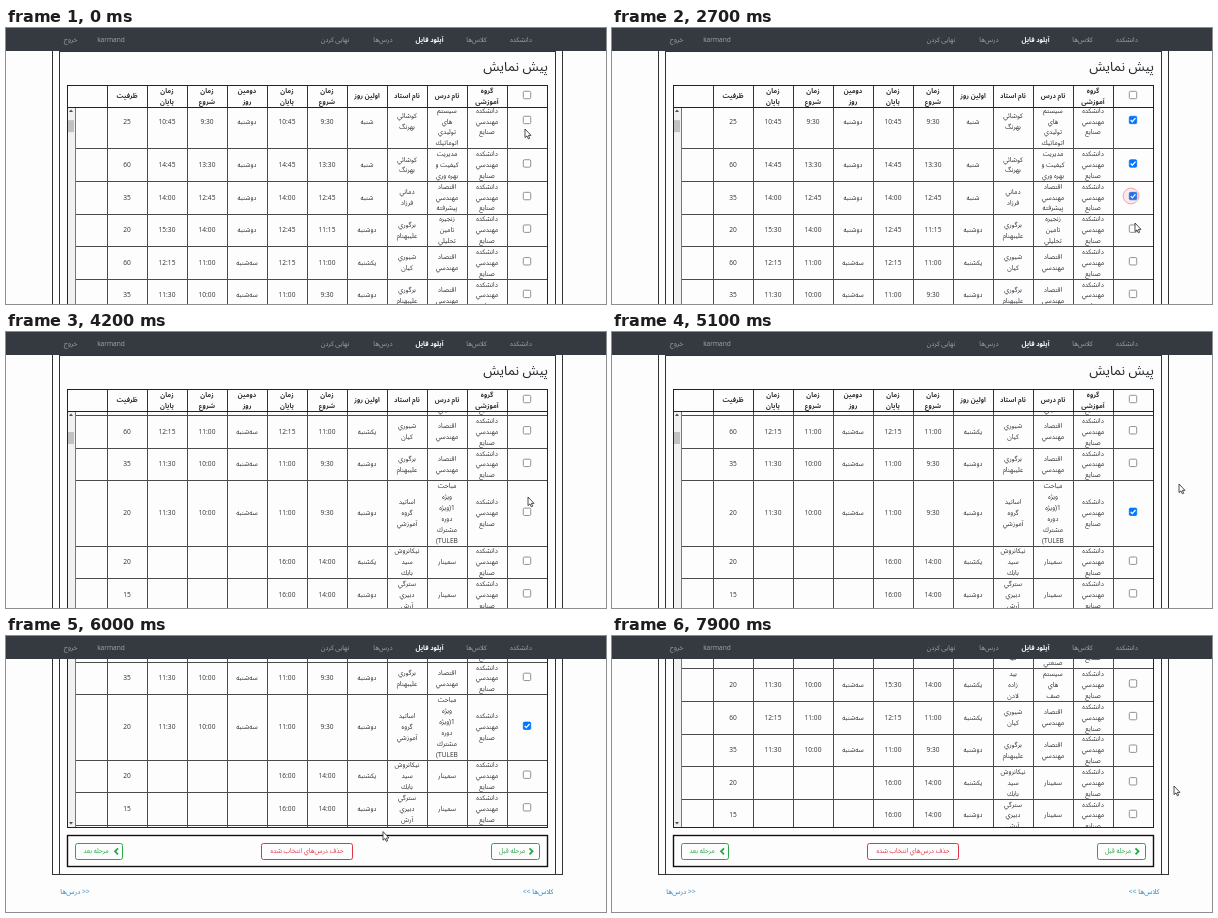
Animation of 600 by 276 pixels, one loop 8 s. Source, as an HTML page:

```html
<!DOCTYPE html>
<html lang="fa">
<head>
<meta charset="utf-8">
<title>پیش نمایش</title>
<style>
  html, body { margin: 0; width: 100%; height: 100%; overflow: hidden; background: #fdfdfd; }
  svg { display: block; }
  text {
    font-family: "Open Sans", "Noto Sans", "Noto Sans Arabic", "DejaVu Sans", sans-serif;
    direction: rtl; text-anchor: middle; white-space: pre;
  }
</style>
</head>
<body>
<svg id="stage" width="600" height="276" viewBox="0 0 600 276"></svg>
<script>
const LOOP = 8000, LINE = 10.87, LIST_TOP = 323, LIST_H = 202;
const INK = '#2b2f33', GREEN = '#28a745', RED = '#dc3545', BLUE = '#1b82cc';
const COLUMNS = [481, 441, 401, 361, 321, 281, 241, 201, 161, 121];
const NON_JOINER = String.fromCharCode(8204);

function add(parent, tag, attrs = {}, content) {
  const node = document.createElementNS('http://www.w3.org/2000/svg', tag);
  for (const key in attrs) node.setAttribute(key, attrs[key]);
  if (content !== undefined) node.textContent = content;
  parent.append(node);
  return node;
}
const group = parent => add(parent, 'g');
const show = (node, on) => node.setAttribute('display', on ? 'inline' : 'none');
const move = (node, x, y) => node.setAttribute('transform', `translate(${x} ${y})`);

// y is the visual middle of the line; "~" stands for a zero-width non-joiner
function label(parent, x, y, content, size = 6.6, fill = INK, attrs = {}) {
  return add(parent, 'text', { x, y: y + size * 0.34, 'font-size': size, fill, ...attrs },
    content.replace('~', NON_JOINER));
}
function lines(parent, x, mid, words, attrs) {
  words.forEach((word, i) =>
    label(parent, x, mid + (i - (words.length - 1) / 2) * LINE, word, 6.6, INK, attrs));
}
function box(parent, x, y, right, bottom, attrs = {}) {
  return add(parent, 'rect', {
    x: x + .5, y: y + .5, width: right - x, height: bottom - y,
    fill: 'none', stroke: '#333', ...attrs
  });
}
const rule = (parent, d, stroke = '#4a4a4a') =>
  add(parent, 'path', { d, stroke, fill: 'none', 'stroke-width': 1 });

function checkbox(parent, x, y, size = 7.4) {
  const g = group(parent), h = size / 2;
  const square = add(g, 'rect', {
    x: x - h, y: y - h, width: size, height: size, rx: 1.2,
    fill: '#fff', stroke: '#777', 'stroke-width': .8
  });
  const tick = add(g, 'path', {
    d: `M${x - 2.3} ${y + .1}l1.6 1.7l3.2-3.6`, fill: 'none', stroke: '#fff', 'stroke-width': 1.3
  });
  return on => {
    square.setAttribute('fill', on ? '#0075ff' : '#fff');
    square.setAttribute('stroke', on ? '#0075ff' : '#777');
    show(tick, on);
  };
}

const stage = document.getElementById('stage');
add(stage, 'rect', { width: 600, height: 276, fill: '#fdfdfd' });
const page = group(stage);

// Upload section
function pageLinks(y) {
  const ltr = { style: 'direction:ltr' };
  label(page, 532, y, '<< کلاس~ها', 6.8, BLUE, ltr);
  label(page, 69, y, 'درس~ها >>', 6.8, BLUE, ltr);
}
const fromRight = { style: 'text-anchor:start' };
const heading = { style: 'text-anchor:start', 'font-weight': 500 };
pageLinks(50);
pageLinks(590);
box(page, 46, 66, 556, 572);
label(page, 301, 97, 'آپلود گزارش 110', 13.2, '#212529', { 'font-weight': 500 });
rule(page, 'M53 130.5H549', '#333');
const intro = label(page, 542, 143, 'برای مشاهده راهنمای این بخش ', 6.6, INK, fromRight);
add(intro, 'tspan', { fill: BLUE }, 'اینجا');
add(intro, 'tspan', {}, ' کلیک کنید');
box(page, 53, 163, 549, 260);
label(page, 542, 179, 'آپلود فایل', 13.2, '#212529', heading);
box(page, 139, 189, 462, 252);
label(page, 452, 210, 'محل آپلود فایل', 6.6, INK, fromRight);
box(page, 183, 200, 405, 219, { rx: 2, stroke: '#dcdfe3', fill: '#fff' });
const formButton = { rx: 1, fill: '#efefef', stroke: '#666' };
box(page, 357, 204, 400, 216, formButton);
label(page, 379, 210, 'Choose File', 6.6, '#111');
label(page, 332.5, 210, 'No file chosen');
box(page, 151, 204, 180, 216, formButton);
label(page, 166, 210, 'Upload', 6.6, '#111');
checkbox(page, 449, 232, 5.8)(false);
label(page, 444, 233, 'اضافه کردن به جدول قبلی', 6.6, INK, fromRight);

// Preview section
box(page, 53, 267, 549, 572);
label(page, 542, 283, 'پیش نمایش', 13.2, '#212529', heading);
const columnRules = (top, bottom) =>
  [...COLUMNS.map(x => x + 20), 101].map(x => `M${x + .5} ${top}V${bottom}`).join('');

const titles = ['گروه آموزشی', 'نام درس', 'نام استاد', 'اولین روز', 'زمان شروع', 'زمان پایان',
  'دومین روز', 'زمان شروع', 'زمان پایان', 'ظرفیت'];
titles.forEach((title, i) => {
  const wrapped = i === 0 || (i > 3 && i < 9);
  lines(page, COLUMNS[i], 312, wrapped ? title.split(' ') : [title], { 'font-weight': 700 });
});
rule(page, columnRules(301, LIST_TOP), '#333');
checkbox(page, 521, 311)(false);

const DEPT = 'دانشكده مهندسي صنايع';
const [SAT, SUN, MON, TUE] = ['شنبه', 'يكشنبه', 'دوشنبه', 'سه~شنبه'];
const courses = [
  ['كنترل كيفيت آماري صنعتي', 'نيك انديش كيا', SUN, '9:30', '11:00', TUE, '9:30', '11:00', '20'],
  ['سيستم هاي صف', 'بيد زاده لادن', SUN, '14:00', '15:30', TUE, '10:00', '11:30', '20'],
  ['طراحي سيستم هاي توليدي اتوماتيك', 'كوشائي بهرنگ', SAT, '9:30', '10:45', MON, '9:30', '10:45', '25'],
  ['مديريت كيفيت_و بهره_وري', 'كوشائي بهرنگ', SAT, '13:30', '14:45', MON, '13:30', '14:45', '60'],
  ['اقتصاد مهندسي پيشرفته', 'دماني فرزاد', SAT, '12:45', '14:00', MON, '12:45', '14:00', '35'],
  ['زنجيره تامين تحليلي', 'برگوري عليبهنام', MON, '11:15', '12:45', MON, '14:00', '15:30', '20'],
  ['اقتصاد مهندسي', 'شيوري كيان', SUN, '11:00', '12:15', TUE, '11:00', '12:15', '60'],
  ['اقتصاد مهندسي', 'برگوري عليبهنام', MON, '9:30', '11:00', TUE, '10:00', '11:30', '35'],
  ['مباحث ويژه 1(ويژه دوره مشترك TULEB)', 'اساتيد گروه آموزشي', MON, '9:30', '11:00', TUE, '10:00', '11:30', '20'],
  ['سمينار', 'نيكانروش سيد بابك', SUN, '14:00', '16:00', '', '', '', '20'],
  ['سمينار', 'سترگي دبيري آرش', MON, '14:00', '16:00', '', '', '', '15'],
  ['سمينار', 'دماني فرزاد', MON, '14:00', '16:00', '', '', '', '15']
];
const CHECKED_AT = { 2: 700, 3: 1600, 4: 2500, 5: 3000, 8: 4400 };

const viewport = add(page, 'svg', { x: 0, y: LIST_TOP, width: 600, height: LIST_H, overflow: 'hidden' });

function buildList(indexes) {
  const g = group(viewport), checks = [];
  let top = 0, d = '';
  for (const i of indexes) {
    const cells = [DEPT, ...courses[i]].map((cell, c) =>
      (c < 3 ? cell.split(' ') : [cell]).map(word => word.replace('_', ' ')));
    const height = LINE * Math.max(...cells.map(words => words.length));
    const mid = top + height / 2;
    cells.forEach((words, c) => lines(g, COLUMNS[c], mid, words));
    checks.push([i, checkbox(g, 521, mid - 1.3)]);
    top += height;
    d += `M69 ${Math.round(top) + .5}H542`;
  }
  rule(g, d + columnRules(0, top));
  return { g, checks };
}
const all = courses.map((_, i) => i);
const fullList = buildList(all);
const shortList = buildList(all.filter(i => !(i in CHECKED_AT)));
shortList.checks.forEach(([, set]) => set(false));

add(viewport, 'rect', { x: 61, y: 0, width: 8, height: LIST_H, fill: '#f1f1f1' });
add(viewport, 'path', { d: 'M63 5l2-2.4l2 2.4zM63 197l2 2.4l2-2.4z', fill: '#505050' });
const thumb = add(viewport, 'rect', { x: 62, width: 6, height: 12, fill: '#c1c1c1' });
rule(page, 'M69.5 323V525', '#777');
box(page, 61, 301, 541, 525, { stroke: '#222' });
rule(page, 'M61 323.5H542', '#222');
box(page, 61, 533, 541, 564, { stroke: '#111', 'stroke-width': 1.4 });

function button(x, right, center, text, color) {
  const frame = box(page, x, 541, right, 557, { rx: 2, stroke: color });
  const caption = label(page, center, 549, text, 6.6, color);
  return hover => {
    frame.setAttribute('fill', hover ? color : 'none');
    caption.setAttribute('fill', hover ? '#fff' : color);
  };
}
button(485, 533, 506, 'مرحله قبل', GREEN);
button(69, 116, 90, 'مرحله بعد', GREEN);
add(page, 'path', {
  d: 'M523.5 546.3l3 3l-3 3M112 546.3l-3 3l3 3', fill: 'none', stroke: GREEN, 'stroke-width': 1.8
});
const setDeleteHover = button(255, 346, 301, 'حذف درس~هاي انتخاب شده', RED);

// Navigation bar
add(stage, 'rect', { width: 600, height: 23, fill: '#343a40' });
[[515, 'دانشکده'], [470.5, 'کلاس~ها'], [423.5, 'آپلود فایل'], [377, 'درس~ها'],
 [329, 'نهایی کردن'], [105, 'karmand'], [64.5, 'خروج']].forEach(([x, text], i) =>
  label(stage, x, 11.5, text, 6.6, i === 2 ? '#fff' : '#a3a7aa', i === 2 ? { 'font-weight': 600 } : {}));

// Pointer
const ring = add(stage, 'circle', { fill: '#ff5a5a', 'fill-opacity': .12, stroke: '#f5a3a8', 'stroke-width': 1 });
const pointer = group(stage);
const pointerStyle = { fill: '#fff', stroke: '#222', 'stroke-width': .8, 'stroke-linejoin': 'round' };
const arrow = add(pointer, 'path', { d: 'M0 0V8.6L2 6.9L3.3 9.8L4.7 9.2L3.4 6.4H6Z', ...pointerStyle });
const hand = add(pointer, 'path', {
  d: 'M-1 1Q0-.6 1 1V4.2L4 5Q5 5.2 5 6.4L4.2 10H-.6L-3.6 6.4Q-3.8 5.2-2.6 5.6L-1 6.8Z', ...pointerStyle
});

// Motion tables: time, values
const POINTER = [
  [0, 519, 101], [100, 519, 101], [300, 520, 94], [600, 521, 91], [1000, 521, 95], [1400, 522, 137],
  [1800, 522, 137], [2300, 522, 170], [2600, 522, 169], [2700, 523, 195], [3200, 521, 197],
  [3500, 518, 184], [3700, 517, 181], [4000, 519, 176], [4200, 522, 165], [4400, 521, 178],
  [4600, 521, 178], [5100, 567, 152], [5500, 567, 152], [6200, 301, 213], [6500, 300, 213],
  [7200, 300, 213], [7800, 561, 151], [7900, 562, 150]
];
const PAGE_SCROLL = [
  [0, 244], [5100, 244], [5200, 262], [5300, 297], [5400, 324], [5500, 334], [6699, 334],
  [6700, 0], [6800, 0], [6900, 60], [7200, 334]
];
const LIST_SCROLL = [
  [0, 89], [3300, 89], [3450, 133], [3680, 135], [3900, 189], [4100, 223.6], [6699, 223.6], [6700, 0]
];
const CLICKS = [
  [700, 520, 92], [1600, 520, 135], [2500, 519, 168], [3000, 520, 200], [4400, 520, 180], [6600, 300, 213]
];
const RELOAD = 6700;

function at(track, t) {
  const next = track.findIndex(step => step[0] > t);
  if (next < 0) return track[track.length - 1].slice(1);
  const a = track[next - 1], b = track[next], k = (t - a[0]) / (b[0] - a[0]);
  return a.slice(1).map((v, i) => v + (b[i + 1] - v) * k);
}

function draw(now) {
  const t = Math.floor(now % LOOP / 100) * 100;
  const [x, y] = at(POINTER, t);
  const scroll = Math.round(at(PAGE_SCROLL, t)[0]);
  const inner = Math.round(at(LIST_SCROLL, t)[0]);
  move(page, 0, -scroll);
  move(fullList.g, 0, -inner);
  thumb.setAttribute('y', 8 + inner * .058);
  show(fullList.g, t < RELOAD);
  show(shortList.g, t >= RELOAD);
  fullList.checks.forEach(([i, set]) => set(t >= CHECKED_AT[i]));

  const over = x > 255 && x < 347 && y + scroll > 541 && y + scroll < 558;
  const pointing = over || (t >= RELOAD && t < 6900);
  setDeleteHover(over);
  show(hand, pointing);
  show(arrow, !pointing);
  move(pointer, x, y);

  const click = CLICKS.find(([start]) => t >= start && t < start + 300);
  show(ring, !!click);
  if (click) {
    ring.setAttribute('cx', click[1]);
    ring.setAttribute('cy', click[2]);
    ring.setAttribute('r', 5 + (t - click[0]) / 70);
  }
}

const start = performance.now();
function tick() {
  draw(Math.max(0, performance.now() - start));
  requestAnimationFrame(tick);
}
tick();
</script>
</body>
</html>
```
